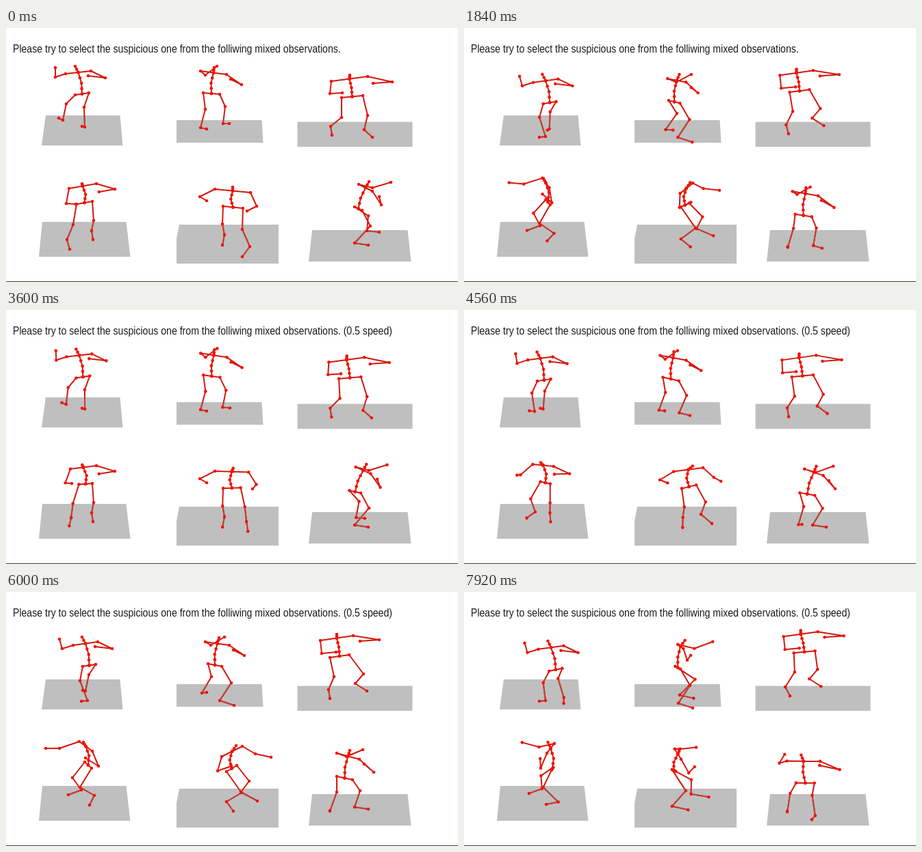
An HTML page with a canvas that plays this animation: 660 px wide and 372 px high, repeating every 8 s.

```html
<!DOCTYPE html>
<html lang="en">
<head>
<meta charset="utf-8">
<style>
html, body { margin: 0; width: 660px; height: 372px; overflow: hidden; background: #fff; }
canvas { position: absolute; left: 0; top: 0; }
p { position: absolute; left: 10px; top: 21px; margin: 0; white-space: pre; color: #1a1a1a;
    font: 16.4px/19px "Liberation Sans", Arial, sans-serif;
    transform: scaleX(.86); transform-origin: 0 0; }
</style>
</head>
<body>
<canvas id="stage" width="660" height="372"></canvas>
<p>Please try to select the suspicious one from the folliwing mixed observations.<span id="speed"> (0.5 speed)</span></p>
<script>
const ctx = document.getElementById('stage').getContext('2d');
const speed = document.getElementById('speed');
const LOOP = 8000, STEP = 80, SLOW = 2880;
const TURN = 1560, END = 2560; // when the first and the second move are complete

const figures = [];
// bow: how far the spine bends sideways
const figure = (bow, ...floor) => figures.push({ bow, floor, limbs: [] });
// Joints outwards from the body, then two moves; the last step of a move carries all further joints.
// A lag above 1 makes the first move start late, below 1 early.
const limb = (joints, move1, move2, lag = 1) => figures.at(-1).limbs.push({ joints, move1, move2, lag });

// Limbs of each figure: head, two arms, two legs
figure(2, 58,128, 166.5,128, 170.5,172, 52,172);
limb([101,56], [10,10], [12,6]);
limb([87,67, 72,72, 72,58], [11,11, 10,11, 6,11], [11,6]);
limb([124,63, 145,73, 120,70], [10,10], [12,6]);
limb([101,98, 88,111, 83,135, 77,132], [11,11, 20,19, 36,24, 33,28], [13,7, 8,3, 0,0]);
limb([121,95, 114,116, 115,145, 111,144], [10,11, 7,5, 1,0], [13,6, 17,6, 31,10, 35,20]);

figure(-2, 249,135, 373.5,135, 375.5,168, 249,168);
limb([304,58], [7,9], [12,4], 1.5);
limb([284,63, 291,69, 308,56], [7,10, 8,9, 11,10], [22,4, 39,5, 46,7], 1.5);
limb([322,68, 344,83, 328,75], [4,10], [-6,5, -23,7, -1,8]);
limb([288,95, 291,119, 284,146, 293,148], [7,10, 9,5, 2,2, 0,-1], [14,4, 39,4, 30,3, 44,9], 1.5);
limb([312,97, 320,115, 317,140, 326,140], [3,12, 9,18, -5,19, 7,26], [1,4]);

figure(1, 425.5,137.5, 593.5,137.5, 593.5,174, 425.5,174);
limb([502,69], [-19,-7], [9,-6], .8);
limb([475,78, 473,96, 491,95], [-16,-7, -12,-6, -9,-7], [8,-6], .8);
limb([528,71, 564,79, 536,81], [-21,-7, -19,-9], [10,-6], .8);
limb([490,102, 490,131, 474,144, 476,157], [-17,-6, -11,-7, -3,-1], [9,-7, 4,-7, -2,-4, 3,-4], .8);
limb([521,99, 528,128, 523,149, 535,160], [-20,-7, -6,-8, -13,-15, -8,-15], [12,-6, -6,-7]);

figure(3, 53,284, 175.5,284, 181.5,335, 48,335);
limb([111,228], [2,-8], [10,0]);
limb([92,235, 88,257, 102,258], [15,-16, -10,-28, -44,-29], [26,3, 33,-2, 28,-9]);
limb([132,228, 159,236, 136,240], [-6,5, -24,19, -20,3], [-5,3, -24,3, -5,1], 2);
limb([103,258, 98,288, 89,310, 93,324], [12,-9, -1,-16, 21,-20, -2,-27], [16,8, 16,-3, 4,-2], .7);
limb([126,254, 128,282, 125,297, 127,310], [-1,4, -20,4, 4,1, -5,2], [3,3, 8,0, 9,10, -2,-1], 2.5);

figure(-3, 253,288, 398,288, 398,345, 249,345, 249,309);
limb([331,233], [5,-8], [-21,5]);
limb([305,236, 283,247, 293,253], [10,5, 26,15, 36,2], [2,4, 20,3, 8,1], 2.5);
limb([357,241, 366,261, 352,268], [-12,-15, -2,-24, 35,-26], [-39,4, -52,-7, -50,-15], .8);
limb([317,261, 316,287, 319,303, 316,318], [5,2, 28,7, 3,4, 16,3], [-19,-3, -21,-3, -19,7, -5,-2], 2);
limb([346,264, 345,295, 356,320, 345,335], [-9,-10, 10,-18, -13,-27, 22,-29], [-29,9, -24,-2, -12,3, -10,-6], .6);

figure(-2, 447,296, 586.5,296, 591.5,342, 442,342);
limb([530,225], [-28,7], [-10,7]);
limb([515,229, 535,234, 562,226], [-32,7, -38,7, -41,5], [-12,12, -38,10, -55,7]);
limb([535,239, 548,259, 545,247], [-19,6, -11,5, -22,5], [4,3, 12,-4, -4,2]);
limb([509,262, 529,275, 527,297, 545,299], [-26,8, -46,18, -54,24, -72,21], [2,10, -7,2, -1,1], .7);
limb([520,267, 532,290, 509,315, 529,318], [-14,8, -15,1, 0,0], [6,5, -9,7, 4,13, -22,16]);

const middle = (a, b) => [(a[0] + b[0]) / 2, (a[1] + b[1]) / 2];

function placeLimb({ joints, move1, move2, lag }, m) {
  const u = Math.min(m / TURN, 1) ** lag;
  const first = u * u * (3 - 2 * u);
  const second = Math.max(0, (m - TURN) / (END - TURN));
  const at = (move, k) => move[k < move.length ? k : move.length - 2 + k % 2];
  const value = k => joints[k] + first * at(move1, k) + second * at(move2, k);
  const points = [];
  for (let k = 0; k < joints.length; k += 2) points.push([value(k), value(k + 1)]);
  return points;
}

function drawFigure({ bow, floor, limbs }, m) {
  const [head, armA, armB, legA, legB] = limbs.map(l => placeLimb(l, m));
  const neck = middle(armA[0], armB[0]), pelvis = middle(legA[0], legB[0]);
  const center = middle(neck, pelvis);
  center[0] += bow;
  const spine = [neck, middle(neck, center), center, middle(center, pelvis), pelvis];
  const chains = [spine, [neck, middle(neck, head[0]), ...head],
    [neck, ...armA], [neck, ...armB], [pelvis, ...legA], [pelvis, ...legB]];

  const ground = new Path2D();
  for (let i = 0; i < floor.length; i += 2) ground.lineTo(floor[i], floor[i + 1]);
  ground.closePath();
  ctx.fillStyle = '#bfbfbf';
  ctx.fill(ground);

  const bones = new Path2D();
  for (const chain of chains) chain.forEach((p, i) => bones[i ? 'lineTo' : 'moveTo'](...p));
  ctx.lineWidth = 2;
  ctx.lineJoin = 'round';
  ctx.strokeStyle = '#d01a10';
  ctx.stroke(bones);
  ctx.save();
  ctx.clip(ground);
  ctx.strokeStyle = '#b9463d';
  ctx.stroke(bones);
  ctx.restore();

  ctx.fillStyle = '#f51205';
  for (const [x, y] of chains.flat()) {
    ctx.beginPath();
    ctx.arc(x, y, 2.3, 0, 7);
    ctx.fill();
  }
}

function draw(now) {
  const t = Math.floor(now % LOOP / STEP) * STEP;
  const slow = t >= SLOW;
  speed.hidden = !slow;
  ctx.fillStyle = '#fff';
  ctx.fillRect(0, 0, 660, 372);
  for (const f of figures) drawFigure(f, slow ? (t - SLOW) / 2 : t);
  ctx.fillStyle = '#3c3f42';
  ctx.fillRect(0, 371, 660, 1);
  requestAnimationFrame(draw);
}
requestAnimationFrame(draw);
</script>
</body>
</html>
```
